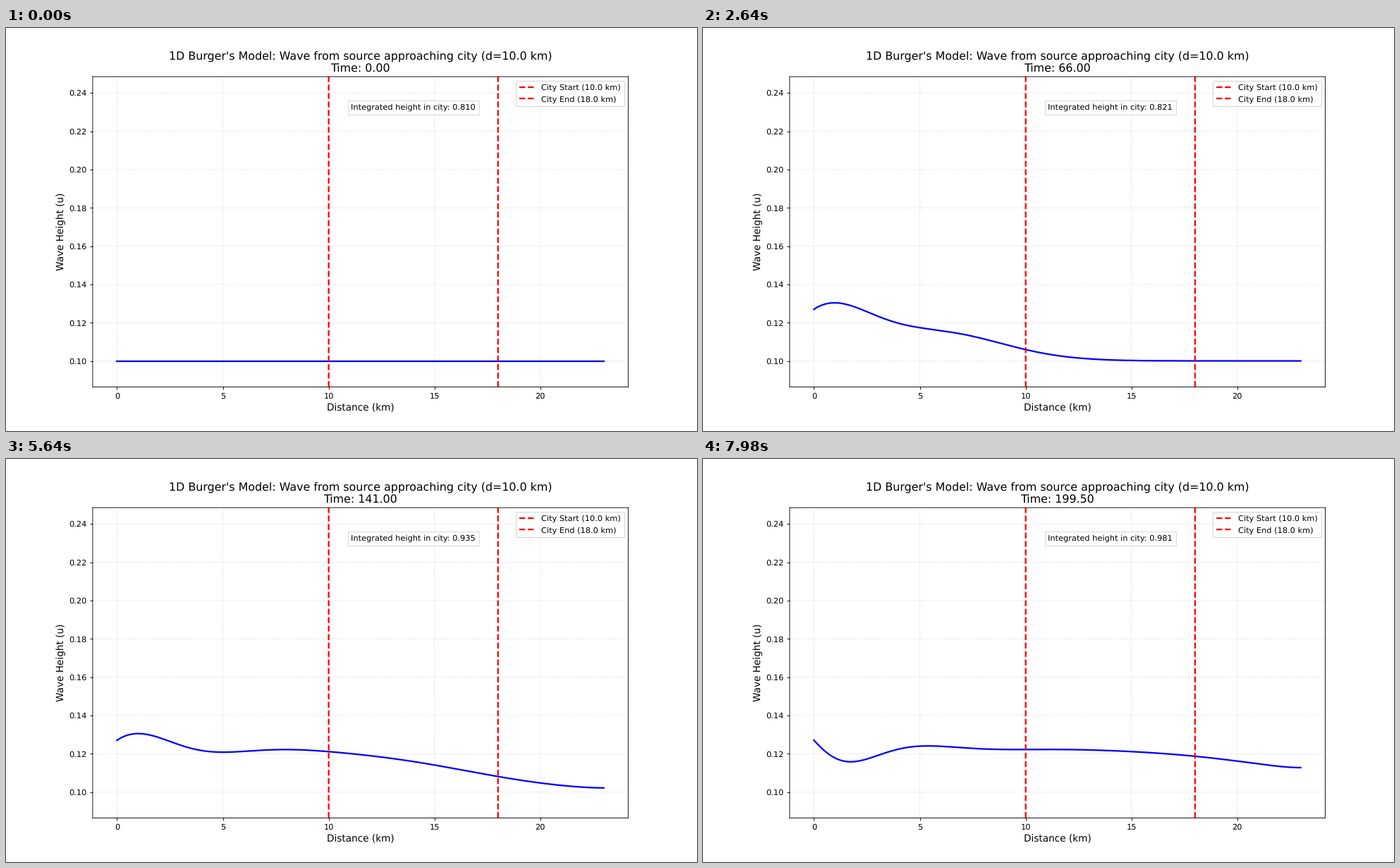
These frames come from a looping animation (980x572 px, 8000 ms). A matplotlib script:

```python
import numpy as np
import matplotlib.pyplot as plt
from matplotlib.animation import FuncAnimation
from matplotlib.transforms import Affine2D

WIDTH, HEIGHT = 980, 572
DPI = WIDTH / 12

# Timing (ms): the picture advances every 60 ms, the timer ticks every 40 ms
LOOP, TICK, HOLD = 8000, 40, 60
STATES = 134
TIME_STEP = 1.5

# Viscous Burgers model with a pulsating source at x = 0
LENGTH, DX, DT = 23.0, 0.1, 0.025
NU = 0.1
BASE, AMP, PULSE = 0.1, 0.035, 37.5
CITY_START, CITY_END = 10.0, 18.0

x = np.linspace(0, LENGTH, round(LENGTH / DX) + 1)
city = slice(round(CITY_START / DX), round(CITY_END / DX) + 1)


def step(u, t):
    """Advance the wave by DT; t is the time after the step."""
    new = u.copy()
    mid, left, right = u[1:-1], u[:-2], u[2:]
    new[1:-1] += DT * (NU * (right - 2 * mid + left) / DX**2
                       - mid * (right - left) / (2 * DX))
    new[0] = BASE + AMP * abs(np.sin(np.pi * t / PULSE))
    new[-1] = new[-2]
    return new


def simulate():
    """Initial state, the state after one step, then one per TIME_STEP."""
    u = np.full(x.size, BASE)
    states = [u]
    per_state = round(TIME_STEP / DT)
    for n in range((STATES - 2) * per_state + 1):
        u = step(u, (n + 1) * DT)
        if n % per_state == 0:
            states.append(u)
    return states


def title_text(t):
    return ("1D Burger's Model: Wave from source approaching city "
            f"(d={CITY_START:.1f} km)\nTime: {t:.2f}")


def height_text(u):
    return f"Integrated height in city: {u[city].sum() * DX:.3f}"


states = simulate()

plt.rcParams["font.family"] = "DejaVu Sans"
plt.rcParams["text.hinting"] = "none"
fig, ax = plt.subplots(
    figsize=((WIDTH + 0.01) / DPI, (HEIGHT + 0.01) / DPI), dpi=DPI)

# Soft, unsnapped rules: the frame sits a fraction of a pixel right and down
dx, dy = 0.41 / WIDTH, 0.41 / HEIGHT
fig.subplots_adjust(left=0.125 + dx, right=0.9 + dx,
                    bottom=0.11 - dy, top=0.88 - dy)

wave, = ax.plot(x, states[0], color="blue", lw=2)
wave.set_transform(ax.transData + Affine2D().translate(-0.25, 0.25))
for name, pos in (("Start", CITY_START), ("End", CITY_END)):
    ax.axvline(pos, color="red", ls="--", lw=2, snap=False,
               label=f"City {name} ({pos:.1f} km)")

ax.set_xlim(-0.05 * LENGTH, 1.05 * LENGTH)
ax.set_ylim(0.0865, 0.2485)
ax.set_xlabel("Distance (km)", fontsize=12)
ax.set_ylabel("Wave Height (u)", fontsize=12)
ax.grid(True, ls=":", alpha=0.6, snap=False)
for part in (*ax.spines.values(), *ax.get_xticklines(), *ax.get_yticklines()):
    part.set_snap(False)
ax.legend(loc="upper right", fontsize=10, labelspacing=0.54)
title = ax.set_title(title_text(0), fontsize=14)
label = ax.text((CITY_START + CITY_END) / 2, 0.2324, height_text(states[0]),
                ha="center", va="center", fontsize=10,
                bbox=dict(facecolor="white", edgecolor="lightgray", alpha=0.8))


def update(i):
    k = min((i * TICK + TICK // 2) // HOLD, STATES - 1)
    u = states[k]
    wave.set_ydata(u)
    title.set_text(title_text(k * TIME_STEP))
    label.set_text(height_text(u))
    return wave, title, label


anim = FuncAnimation(fig, update, frames=LOOP // TICK, interval=TICK,
                     repeat=True, repeat_delay=0, blit=False)
plt.show()
```
